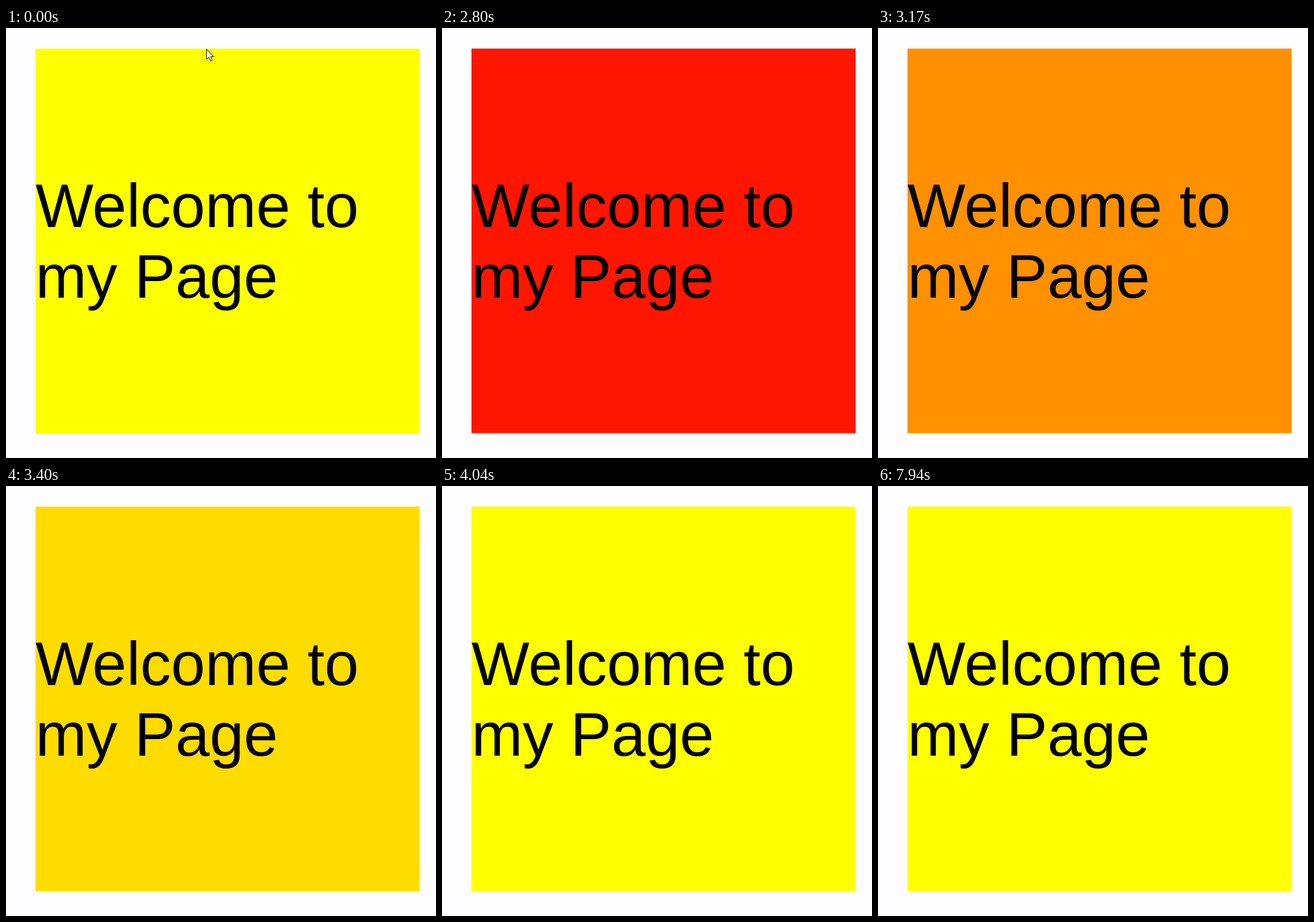
An HTML page that plays this animation: 700 by 700 pixels, repeating every 8 s.

```html
<!DOCTYPE html>
<html lang="en">
<head>
<meta charset="utf-8">
<title>Welcome</title>
<style>
  html, body { margin: 0; width: 100%; height: 100%; overflow: hidden; background: #fdfdff; }
  svg { display: block; }
  text { font: 100px "Liberation Sans", Arial, sans-serif; }
</style>
</head>
<body>
<svg width="700" height="700">
  <rect id="page" x="48" y="33.5" width="625.4" height="626" fill="#ff0"/>
  <text x="48" y="324">Welcome to</text>
  <text x="48" y="439">my Page</text>
  <path id="cursor" transform="translate(326 34)" fill="#fff" stroke="#000"
    d="M.5 .5V17.2L4.4 13.5L7 19H9.3V17.5L7.2 12.5H12.3Z"/>
</svg>
<script>
const LOOP = 8000, RELOAD = 2570, FADE = 1120, CURSOR_EXIT = 30;
const page = document.getElementById('page');
const cursor = document.getElementById('cursor');

// cubic-bezier(.42, 0, .58, 1), solved by bisection
function easeInOut(x) {
  let lo = 0, hi = 1, s = 0.5;
  for (let i = 0; i < 20; i++) {
    s = (lo + hi) / 2;
    const bx = 3 * s * (1 - s) * (0.42 * (1 - s) + 0.58 * s) + s ** 3;
    if (bx < x) lo = s; else hi = s;
  }
  return s * s * (3 - 2 * s);
}

function draw(now) {
  const t = now % LOOP;
  const progress = (t - RELOAD) / FADE;
  const fading = progress >= 0 && progress < 1;
  const green = fading ? Math.round(255 * easeInOut(progress)) : 255;
  page.setAttribute('fill', `rgb(255, ${green}, 0)`);
  cursor.style.display = t < CURSOR_EXIT ? '' : 'none';
}

const start = performance.now();
function tick() {
  draw(performance.now() - start);
  requestAnimationFrame(tick);
}
tick();
</script>
</body>
</html>
```
